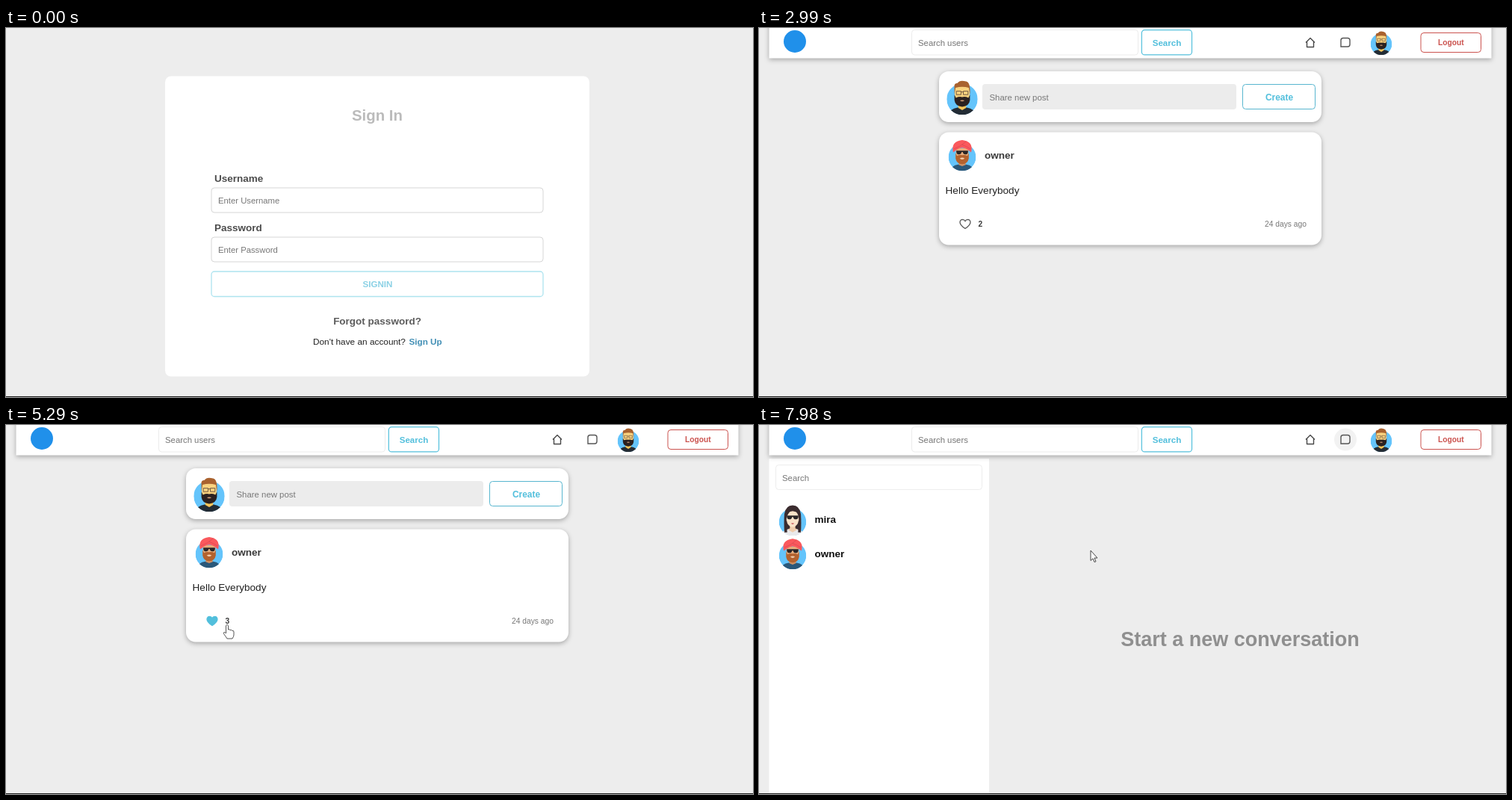
Recreate the animation shown at these times as an HTML page. Size 1000 by 494 pixels, loop 8 s.

```html
<!DOCTYPE html>
<html lang="en">
<head>
<meta charset="utf-8">
<title>Social app</title>
<style>
html, body { margin: 0; width: 100%; height: 100%; overflow: hidden; background: #ededed; }
svg { display: block; width: 100vw; height: 100vh; font-family: "Liberation Sans", Arial, sans-serif; }
.card { fill: #fff; filter: drop-shadow(0 2px 3px rgba(0, 0, 0, .3)); }
</style>
</head>
<body>
<svg id="stage" viewBox="0 0 1000 494" preserveAspectRatio="none"></svg>
<script>
const USER = 'visitor', OWNER = 'owner', FRIEND = 'mira';
const BLUE = '#52bfdc', RED = '#cb524e';
const stage = document.getElementById('stage');
const $ = id => document.getElementById(id);

const text = (x, y, size, fill, str, opt = '') =>
  `<text x="${x}" y="${y}" font-size="${size}" fill="${fill}" ${opt}>${str}</text>`;
const bold = (x, y, size, fill, str, opt = '') =>
  text(x, y, size, fill, str, 'font-weight="700" ' + opt);
const mid = (x, y, size, fill, str, opt = '') =>
  bold(x, y, size, fill, str, 'text-anchor="middle" ' + opt);
const box = (x, y, w, h, r, fill, stroke = 'none', opt = '') =>
  `<rect x="${x}" y="${y}" width="${w}" height="${h}" rx="${r}" fill="${fill}" stroke="${stroke}" ${opt}/>`;
const card = (x, y, w, h, r) => box(x, y, w, h, r, '#fff', 'none', 'class="card"');
const path = (d, fill, stroke = 'none', opt = '') =>
  `<path d="${d}" fill="${fill}" stroke="${stroke}" ${opt}/>`;
const group = (id, body, opt = '') => `<g id="${id}" ${opt}>${body}</g>`;

// Avatars are drawn around a disc of radius 20; the head rises above it.
const shades = path('M-8.500-9.500H8.500Q9-4 4.800-4Q1.500-4 .8-7.500H-.8Q-1.500-4-4.800-4Q-9-4-8.500-9.500Z', '#2a2527');
const shoulders = color => path('M-17 20Q-16 12-6 10.500H6Q16 12 17 20Z', color);
const looks = {
  beard:
    shoulders('#232c35') +
    path('M-5 5H5V11L0 14L-5 11Z', '#f7c559') +
    path('M-9.500-17H9.500V-1Q8 7 0 7Q-8 7-9.500-1Z', '#f9d27f') +
    path('M-10-6L-8-2Q-4-4 0-3Q4-4 8-2L10-6V1Q9 9 0 9.500Q-9 9-10 1Z', '#2b2120') +
    path('M-3 1.500Q0 .5 3 1.500Q0 4-3 1.500Z', '#d9a37c') +
    path('M-10-6V-15Q-11-21-6-21Q-3-25.500 5-23Q11-22 10-6L8.500-15Q0-17-8.500-15Z', '#a9622f') +
    path('M-7.500-10.500H-1.500V-6H-7.500ZM1.500-10.500H7.500V-6H1.500ZM-1.500-9.500H1.500', 'none', '#6b5340', 'stroke-width=".9"'),
  turban:
    shoulders('#2a587a') +
    path('M-5 5H5V11L0 13L-5 11Z', '#cf9062') +
    path('M-9-13H9V2Q7 8 0 8Q-7 8-9 2Z', '#e6ad7c') +
    path('M-9.500-6L-7.500-2Q-4-4 0-3Q4-4 7.500-2L9.500-6V2Q8 10 0 10Q-8 10-9.500 2Z', '#b3622e') +
    path('M-3.500 1.500Q0-.5 3.500 1.500Q0 5-3.500 1.500Z', '#f3cfae') +
    path('M-13-7Q-17-23 0-25Q17-23 13-7L8.500-10.500Q0-17-8.500-10.500Z', '#fa595d') +
    path('M-12-12Q-3-15 6-23M12-12Q6-16 0-18', 'none', '#e04d54') + shades,
  long:
    path('M-12 16Q-13 0-12-12Q-10-24.500 0-24.500Q10-24.500 12-12Q13 0 12 16Z', '#3b2c2f') +
    path('M-17 20Q-16 12-6 10H6Q16 12 17 20Z', '#e9e9eb') +
    path('M-4 3H4V9L7 11L0 15L-7 11L-4 9Z', '#f0cdac') +
    path('M-9-12Q0-20 9-12V-2Q7 6 0 7.500Q-7 6-9-2Z', '#fae2c8') +
    path('M-9.500-5Q-7-14 1-20Q8-14 9.500-5L11-14Q6-24-3-22Q-12-18-11-7Z', '#3b2c2f') +
    path('M-12-2H-8.500L-8 15H-12ZM8.500-2H12V15H8Z', '#3b2c2f') +
    path('M-2.500 2Q0 1 2.500 2Q0 4.500-2.500 2Z', '#c9565c') + shades
};
const avatar = (look, x, y, r) =>
  `<g transform="translate(${x} ${y}) scale(${r / 20})" clip-path="url(#bust)">` +
  `<circle r="20" fill="#64c4fb"/>${looks[look]}</g>`;

const heart = 'M276 268.500Q269 264 269 260Q269.300 256.500 272.500 256.300Q275 256.300 276 258.500Q277 256.300 279.500 256.300Q282.700 256.500 283 260Q283 264 276 268.500Z';

const signIn =
  box(213, 64.500, 568, 402, 8, '#fff') +
  mid(497, 123.500, 20.400, '#bbb', 'Sign In') +
  bold(279, 206, 13.500, '#4c4c4c', 'Username') +
  box(275, 214, 444, 33, 4, '#fff', '#d6d6d6') +
  text(284, 235, 11.300, '#777', '', 'id="name"') +
  bold(279, 272, 13.500, '#4c4c4c', 'Password') +
  box(275, 280, 444, 33, 4, '#fff', '#d6d6d6') +
  text(284, 301, 11.300, '#777', '', 'id="pass"') +
  group('button', box(275, 326, 444, 33.500, 4, '#fff', '#8fdaea', 'stroke-width="1.300"') +
    mid(497.500, 347, 11.600, '#5fc0dc', 'SIGNIN')) +
  mid(497, 397, 13.500, '#5c5c5c', 'Forgot password?') +
  text(411, 424, 11.840, '#222', "Don't have an account?") +
  bold(539.500, 424, 11.700, '#428fb5', 'Sign Up') +
  box(0, 224, 1, 13, 0, '#111', 'none', 'id="caret"');

const header =
  card(13.500, -10, 967, 50.500, 0) +
  '<circle cx="48" cy="18" r="15" fill="#2090ea"/>' +
  box(204.500, 2.500, 303, 33.500, 4, '#fff', '#ececec') +
  text(213, 24, 11.350, '#757575', 'Search users') +
  box(512.300, 2.700, 67.200, 33.200, 4, '#fff', BLUE, 'stroke-width="1.200"') +
  mid(546, 23.700, 11.550, BLUE, 'Search') +
  path('M732 19.500L738 13.500L744 19.500M733.500 18.500V25.500H742.500V18.500', 'none', '#484848', 'stroke-width="1.400" stroke-linejoin="round"') +
  '<circle id="hover" cx="785" cy="19.500" r="15" fill="#f2f2f2"/>' +
  path('M779 25V16.500Q779 13.500 782 13.500H788Q791 13.500 791 16.500V22Q791 25 788 25Z', 'none', '#555', 'stroke-width="1.400"') +
  avatar('beard', 833, 21.800, 14.400) +
  box(886, 6.500, 80.500, 26, 4, '#fff', RED) +
  mid(926.300, 23, 10.200, RED, 'Logout');

const feed =
  card(241, 58, 512, 68, 13) +
  avatar('beard', 272, 95.500, 20.800) +
  box(299, 75, 340, 34, 4, '#ececec') +
  text(308.500, 96.500, 11.400, '#777', 'Share new post') +
  box(647.500, 75.500, 97, 33, 4, '#fff', '#58b6cf') +
  mid(696.500, 96.500, 11.900, BLUE, 'Create') +
  card(241, 139.500, 512, 151, 13) +
  avatar('turban', 272, 173, 18.500) +
  bold(302, 175, 13.550, '#3a3a3a', OWNER) +
  text(249.500, 222, 13.600, '#222', 'Hello Everybody') +
  path(heart, 'none', '#555', 'id="heart" stroke-width="1.300"') +
  bold(293.500, 266, 10.200, '#3a3a3a', '2', 'id="count"') +
  text(677, 266, 10.250, '#777', '24 days ago');

const people = [['turban', OWNER], ['long', FRIEND], ['beard', USER]];
const likes =
  box(0, 0, 1000, 494, 0, '#fff', 'none', 'opacity=".6"') +
  card(270, 153, 454.500, 225, 12) +
  bold(296.500, 186.500, 15.600, '#333', 'Likes') +
  path('M692 177L702 187M702 177L692 187', 'none', '#555', 'stroke-width="1.300"') +
  box(283, 0, 429, 45.500, 3, '#f7f7f7', 'none', 'id="row"') +
  people.map(([look, name], i) =>
    avatar(look, 306, 229.500 + 45.500 * i, 18.300) +
    bold(335.500, 231.500 + 45.500 * i, 13.550, '#333', name)).join('');

const chat =
  box(13.500, 45, 294.500, 449, 0, '#fff') +
  box(22.500, 53.500, 276, 33, 4, '#fff', '#ededed') +
  text(31, 74.500, 11.350, '#777', 'Search') +
  avatar('long', 45, 130, 18.300) + bold(74.500, 131, 13.550, '#111', FRIEND) +
  avatar('turban', 45, 175, 18.300) + bold(74.500, 176.500, 13.550, '#111', OWNER) +
  mid(644, 295.700, 27, '#8f8f8f', 'Start a new conversation');

const pointer =
  path('M0 0V13.500L3 10.800L5 15.500L7 14.700L5 10H9Z', '#fff', '#444', 'id="arrow" stroke-width="1"') +
  path('M-1.500 1.500Q0-1 1.500 1.500V7Q3 6 4 7.500Q6 6.500 6.500 8.300Q9 7.700 9 10V14Q9 16 7 19H0Q-2 16-4.500 12.500Q-5 10-3 10.500L-1.500 12Z',
    '#fff', '#555', 'id="hand" stroke-width="1"');

stage.innerHTML =
  '<defs><clipPath id="bust"><path d="M-20 0V-30H20V0A20 20 0 0 1-20 0Z"/></clipPath></defs>' +
  box(0, 0, 1000, 494, 0, '#ededed') +
  group('signIn', signIn) + group('feed', feed) + group('chat', chat) + group('header', header) +
  group('likes', likes) + group('pointer', pointer) +
  box(0, 493, 1000, 1, 0, '#222');

const nameKeys = [480, 660, 850, 1080, 1250, 1430, 1570];
const passKeys = [2130, 2200, 2340, 2390, 2430, 2520];
// time, x, y of the pointer's tip
const route = [
  [3570, 600, 130], [4320, 276, 262], [4950, 276, 262], [5200, 296, 267], [5940, 296, 267],
  [6360, 586, 220], [6700, 697, 182], [6830, 697, 182], [7020, 837, 46],
  [7330, 786, 20], [7640, 786, 20], [7980, 444, 168]
];

const clamp = v => Math.min(1, Math.max(0, v));
const show = (id, on) => $(id).style.display = on ? '' : 'none';
const typed = (keys, t) => keys.filter(k => t >= k).length;

function tipAt(t) {
  let i = 0;
  while (i < route.length - 2 && t >= route[i + 1][0]) i++;
  const [a, b] = [route[i], route[i + 1]];
  const p = clamp((t - a[0]) / (b[0] - a[0])), e = p * p * (3 - 2 * p);
  return [a[1] + (b[1] - a[1]) * e, a[2] + (b[2] - a[2]) * e];
}

function fill(id, value, hint) {
  $(id).textContent = value || hint;
  $(id).setAttribute('fill', value ? '#222' : '#777');
}

function drawSignIn(t) {
  const name = USER.slice(0, typed(nameKeys, t));
  const dots = '•'.repeat(typed(passKeys, t));
  fill('name', name, 'Enter Username');
  fill('pass', dots, 'Enter Password');
  $('button').setAttribute('opacity', .72 + .28 * clamp((t - 140) / 710));
  const onPass = t >= 1900, value = onPass ? dots : name;
  const x = 284 + (value ? $(onPass ? 'pass' : 'name').getComputedTextLength() : 0);
  $('caret').setAttribute('x', x);
  $('caret').setAttribute('y', onPass ? 290 : 224);
  show('caret', t >= 140);
}

function draw(now) {
  const t = now % 8000, login = t < 2700, chatting = t >= 7660;
  const fade = clamp((t - 5730) / 130) * (1 - clamp((t - 6810) / 130));
  const [x, y] = tipAt(t);
  const inChatIcon = Math.hypot(x - 785, y - 19.5) < 15;

  show('signIn', login);
  show('header', !login);
  show('feed', !login && !chatting);
  show('chat', chatting);
  if (login) drawSignIn(t);

  const liked = t >= 4400;
  $('heart').setAttribute('fill', liked ? BLUE : 'none');
  $('heart').setAttribute('stroke', liked ? BLUE : '#555');
  $('count').textContent = liked ? 3 : 2;
  show('hover', chatting || (inChatIcon && t > 7000));

  show('likes', fade > 0);
  $('likes').setAttribute('opacity', fade);
  const row = Math.floor((y - 204.5) / 45.5);
  const onRow = fade > 0 && x > 283 && x < 712 && row >= 0 && row < 3;
  show('row', onRow);
  if (onRow) $('row').setAttribute('y', 204.5 + 45.5 * row);

  const onLike = x < 302 && y > 252 && y < 272;
  const onClose = fade > 0 && Math.hypot(x - 697, y - 182) < 12;
  const hand = onRow || onClose || onLike || inChatIcon;
  show('pointer', t >= 3570);
  show('hand', hand);
  show('arrow', !hand);
  $('pointer').setAttribute('transform', `translate(${x} ${y})`);
  requestAnimationFrame(draw);
}
requestAnimationFrame(draw);
</script>
</body>
</html>
```
